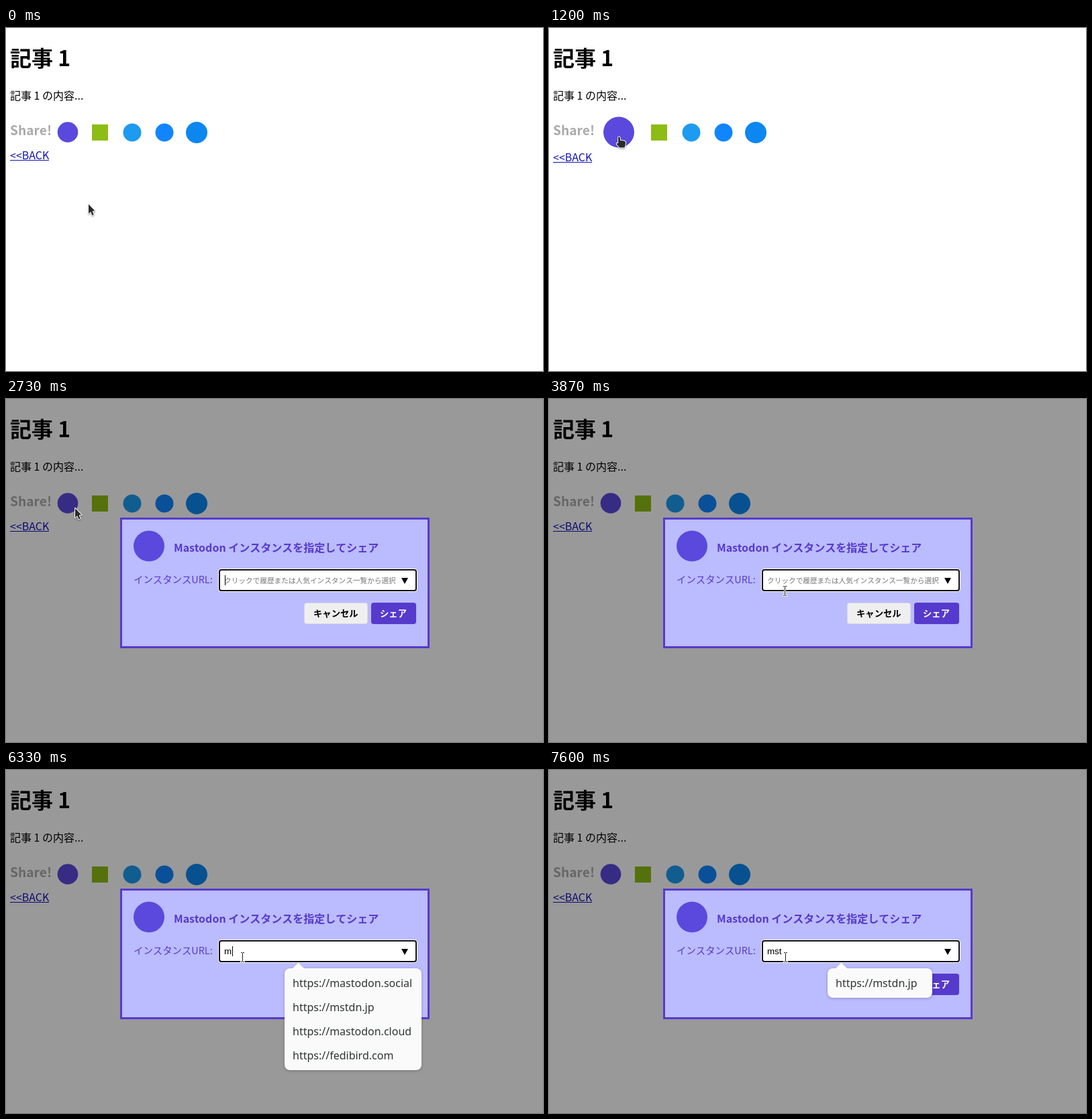
An HTML page with a canvas for the animation above (8 s loop, 800 px wide and 512 px high).

```html
<!DOCTYPE html>
<html lang="ja">
<head>
<meta charset="utf-8">
<title>Share dialog</title>
<style>
html, body { margin: 0; width: 100%; height: 100%; overflow: hidden; background: #fff; }
canvas { display: block; }
</style>
</head>
<body>
<canvas id="stage" width="800" height="512"></canvas>
<script>
const ctx = document.getElementById('stage').getContext('2d');
const LOOP = 8000;
const JP = '"Noto Sans CJK JP", "Noto Sans CJK", sans-serif';
const UI = '"Noto Sans", "Open Sans", sans-serif';
const FIELD = '"Liberation Sans", Arial, sans-serif';
const PURPLE = '#563acc';
const MARK = '#5a49dc';

// Pointer path: time, x, y
const PATH = [
  [0, 122, 262], [70, 122, 262], [200, 131, 247], [400, 131, 247],
  [1050, 102, 162], [2950, 102, 162], [3870, 351, 286], [4130, 352, 279]
];
const OPEN = 2700;
const TYPED = [[6270, 'm'], [6630, 'ms'], [7000, 'mst']];
const HOSTS = ['mastodon.social', 'mstdn.jp', 'mastodon.cloud', 'fedibird.com'];

const ease = p => p * p * (3 - 2 * p);

function pointerAt(t) {
  const i = PATH.findIndex(k => k[0] > t);
  if (i < 0) return PATH[PATH.length - 1].slice(1);
  const [t0, x0, y0] = PATH[i - 1], [t1, x1, y1] = PATH[i];
  const p = ease((t - t0) / (t1 - t0));
  return [Math.round(x0 + (x1 - x0) * p), Math.round(y0 + (y1 - y0) * p)];
}

function text(str, x, y, font, color) {
  ctx.font = font;
  ctx.fillStyle = color;
  ctx.fillText(str, x, y);
}

function box(x, y, w, h, r, color) {
  ctx.fillStyle = color;
  ctx.beginPath();
  ctx.roundRect(x, y, w, h, r);
  ctx.fill();
}

function disc(x, y, r, color) {
  ctx.fillStyle = color;
  ctx.beginPath();
  ctx.arc(x, y, r, 0, Math.PI * 2);
  ctx.fill();
}

function polygon(points) {
  ctx.beginPath();
  points.forEach(([x, y]) => ctx.lineTo(x, y));
  ctx.closePath();
}

function drawPage(hover) {
  const dx = hover ? 24 : 0, dy = hover ? 3 : 0;
  ctx.fillStyle = '#fff';
  ctx.fillRect(0, 0, 800, 512);
  text('記事 1', 6, 57, 'bold 32px ' + JP, '#000');
  text('記事 1 の内容...', 6, 107, '16px ' + JP, '#000');
  text('Share!', 6, 160, 'bold 19.2px ' + JP, '#aaa');

  disc(92 + dx / 2, 155.5, hover ? 23 : 15.3, MARK);
  box(128 + dx, 144, 24, 24, 0, '#8dbc14');
  disc(188 + dx, 156, 13.5, '#1d9bf0');
  disc(236 + dx, 156, 13.5, '#1185fe');
  disc(284 + dx, 156, 16, '#0d87f0');

  text('<<BACK', 6, 196 + dy, '16px ' + JP, '#1010b8');
  ctx.fillRect(6, 197 + dy, 58, 1);
}

function drawField(t, value) {
  box(316, 253, 297, 35, 5, '#fff');
  box(317, 254, 295, 33, 4, '#101010');
  box(319, 256, 291, 29, 2, '#fff');
  if (value) text(value, 325, 275, '13.333px ' + FIELD, '#000');
  else text('クリックで履歴または人気インスタンス一覧から選択', 325, 275, '10.667px ' + JP, '#757575');

  ctx.fillStyle = '#000';
  polygon([[589, 267], [599, 267], [594, 276]]);
  ctx.fill();

  // The caret restarts its blink on every key
  const keys = TYPED.filter(k => k[0] <= t);
  const since = keys.length ? keys[keys.length - 1][0] : OPEN;
  if (Math.floor((t - since) / 595) % 2 === 0) {
    ctx.font = '13.333px ' + FIELD;
    const x = value ? 326 + Math.round(ctx.measureText(value).width) : 326;
    ctx.fillRect(x, 263, 1, 15);
  }
}

function drawDialog(t, value) {
  ctx.fillStyle = 'rgba(0, 0, 0, 0.4)';
  ctx.fillRect(0, 0, 800, 512);
  box(170, 177, 461, 195, 0, PURPLE);
  box(173, 180, 455, 189, 0, '#bbbbff');
  disc(213, 219.5, 23, MARK);
  text('Mastodon インスタンスを指定してシェア', 250, 228, 'bold 16px ' + JP, PURPLE);
  text('インスタンスURL:', 190, 275, '14.4px ' + JP, PURPLE);
  drawField(t, value);

  const label = 'bold 13.333px ' + JP;
  box(444, 304, 95, 32, 4, '#d8d8de');
  box(445, 305, 93, 30, 3, '#efefef');
  text('キャンセル', 458, 325, label, '#000');
  box(544, 304, 67, 32, 4, PURPLE);
  text('シェア', 557, 325, label, '#fff');
}

function drawPopup(hosts) {
  const w = hosts.length > 1 ? 204 : 156, h = 8 + 36 * hosts.length;
  ctx.save();
  ctx.shadowColor = 'rgba(0, 0, 0, 0.25)';
  ctx.shadowBlur = 4;
  ctx.shadowOffsetY = 1;
  box(415, 296, w, h, 8, '#fafafa');
  ctx.restore();
  polygon([[426, 297], [435.5, 288], [445, 297]]);
  ctx.fill();
  hosts.forEach((host, i) =>
    text('https://' + host, 427, 324 + 36 * i, '500 16px ' + UI, '#2e3436'));
}

function drawOutlined(shape) {
  ctx.lineJoin = 'round';
  ctx.strokeStyle = '#fff';
  ctx.lineWidth = 2;
  ctx.fillStyle = '#2a2a2a';
  shape();
  ctx.save();
  ctx.shadowColor = 'rgba(0, 0, 0, 0.45)';
  ctx.shadowBlur = 2;
  ctx.shadowOffsetY = 1;
  ctx.stroke();
  ctx.restore();
  ctx.fill();
}

function arrow() {
  polygon([[1, 1], [1, 15], [4.2, 12.2], [6.4, 17.4], [8.8, 16.4], [6.6, 11.2], [10.4, 11]]);
}

function hand() {
  ctx.beginPath();
  ctx.moveTo(1.2, 8.5);
  ctx.lineTo(1, 1.5);
  ctx.quadraticCurveTo(2.3, -0.8, 3.8, 1.5);
  ctx.lineTo(4.2, 6);
  ctx.lineTo(8.5, 6.3);
  ctx.quadraticCurveTo(12, 6.8, 12, 9);
  ctx.lineTo(11.6, 13.5);
  ctx.lineTo(10.5, 16.5);
  ctx.lineTo(3.2, 16.5);
  ctx.lineTo(-1.2, 11.5);
  ctx.quadraticCurveTo(-1.8, 9, 1.2, 10);
  ctx.closePath();
}

function beam() {
  const bars = [[-2.5, -7.5, 2, 1], [0.5, -7.5, 2, 1], [-0.5, -6.5, 1, 13], [-2.5, 6.5, 2, 1], [0.5, 6.5, 2, 1]];
  ctx.fillStyle = 'rgba(255, 255, 255, 0.85)';
  bars.forEach(([x, y, w, h]) => ctx.fillRect(x - 1, y - 1, w + 2, h + 2));
  ctx.fillStyle = '#222';
  bars.forEach(([x, y, w, h]) => ctx.fillRect(x, y, w, h));
}

function drawPointer(x, y, hover) {
  const inField = x > 317 && x < 580 && y > 254 && y < 288;
  ctx.save();
  if (inField) {
    ctx.translate(x + 0.5, y + 0.5);
    beam();
  } else {
    ctx.translate(x, y);
    drawOutlined(hover ? hand : arrow);
  }
  ctx.restore();
}

function draw(t) {
  const [x, y] = pointerAt(t);
  const open = t >= OPEN;
  const hover = !open && x < 110 && y < 173;
  const value = TYPED.reduce((v, k) => t >= k[0] ? k[1] : v, '');
  drawPage(hover);
  if (open) drawDialog(t, value);
  if (t >= 6310) drawPopup(HOSTS.filter(h => value === 'm' || h.startsWith(value)));
  drawPointer(x, y, hover);
}

function tick() {
  draw(performance.now() % LOOP);
  requestAnimationFrame(tick);
}
tick();
</script>
</body>
</html>
```
